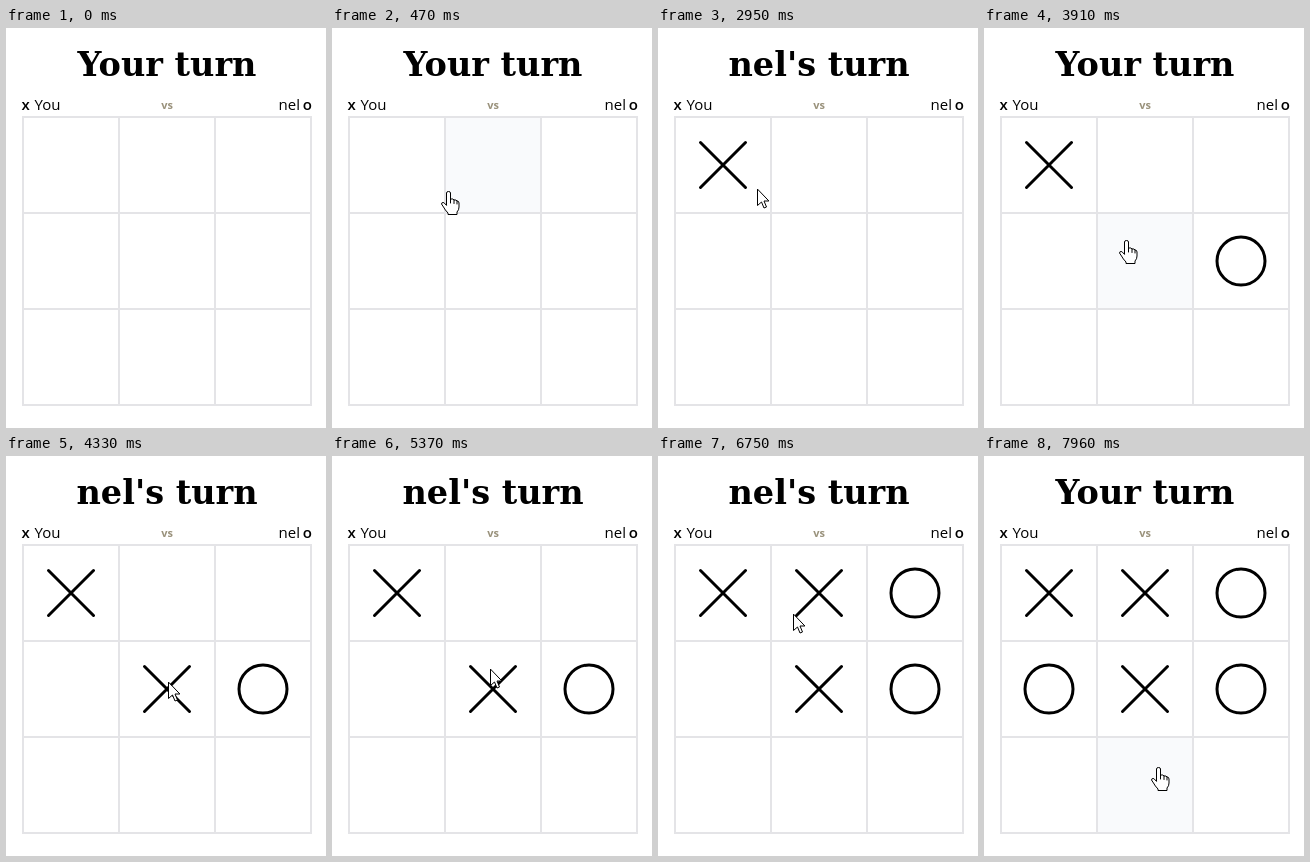
These frames come from a looping animation (320x400 px, 7.99 s). An HTML page:

```html
<!DOCTYPE html>
<html lang="en">
<head>
<meta charset="utf-8">
<title>Tic-tac-toe</title>
<style>
html, body { margin: 0; width: 100%; height: 100%; overflow: hidden; background: #fff; }
svg { display: block; width: 320px; height: 400px; }
text { font: 15px "Open Sans", "Noto Sans", sans-serif; }
.bold { font-weight: 600; }
#title { font: 700 33.5px "DejaVu Serif", "Noto Serif", serif; }
#vs { font-size: 11px; font-weight: 700; fill: #9a927c; }
#marks { fill: none; stroke: #000; stroke-width: 3; stroke-linecap: round; }
#cursor path { fill: #fff; stroke: #000; stroke-linejoin: round; stroke-linecap: round; }
</style>
</head>
<body>
<svg viewBox="0 0 320 400">
  <text id="title" x="161" y="48" text-anchor="middle">Your turn</text>
  <text class="bold" x="15.5" y="82">x</text>
  <text x="28.5" y="82">You</text>
  <text id="vs" x="161" y="81" text-anchor="middle">vs</text>
  <text x="294" y="82" text-anchor="end">nel</text>
  <text class="bold" x="306" y="82" text-anchor="end">o</text>
  <rect id="hover" width="96" height="96" fill="#f9fafc"/>
  <path d="M17 89H305V377H17ZM113 89V377M209 89V377M17 185H305M17 281H305" fill="none" stroke="#e4e4e7" stroke-width="2"/>
  <g id="marks"></g>
  <g id="cursor">
    <path id="arrow" d="M.5 .5V16.5L4.5 13L7 19L9.5 18L7 12H11.5Z"/>
    <g id="hand">
      <path d="M-1.5 14V2Q-1.5 .5 .5 .5Q2.5 .5 2.5 2V8Q5.5 7.5 6 9Q8.5 8.5 9 10Q11 10 11 12V16Q11 19 9 21V23.5H0V22Q-3 19 -4.5 16L-6.5 13Q-6.5 11 -4.5 11.5Z"/>
      <path d="M2.5 8V12M6 9V12.5M9 10V13" style="fill:none"/>
    </g>
  </g>
</svg>
<script>
const LOOP = 7990, LEFT = 17, TOP = 89, CELL = 96;
const $ = id => document.getElementById(id);

// players alternate, x first
const moves = [
  { at: 940, col: 0, row: 0 },
  { at: 3450, col: 2, row: 1 },
  { at: 4270, col: 1, row: 1 },
  { at: 5400, col: 2, row: 0 },
  { at: 6130, col: 1, row: 0 },
  { at: 7650, col: 0, row: 1 }
];

const entry = { x: 290, y: 384 };
const glides = [
  { from: 60, to: 570, x: 92, y: 154 },
  { from: 2900, to: 3070, x: 111, y: 167 },
  { from: 3720, to: 4090, x: 162, y: 226 },
  { from: 5170, to: 5370, x: 158, y: 213 },
  { from: 5610, to: 5900, x: 144, y: 125 },
  { from: 6400, to: 6750, x: 135, y: 158 },
  { from: 6860, to: 7140, x: 135, y: 168 },
  { from: 7630, to: 7960, x: 174, y: 311 }
];

const marks = moves.map(({ col, row }, i) => {
  const x = LEFT + (col + .5) * CELL, y = TOP + (row + .5) * CELL;
  const ns = "http://www.w3.org/2000/svg";
  const el = document.createElementNS(ns, i % 2 ? "circle" : "path");
  const attrs = i % 2
    ? { cx: x, cy: y, r: 24 }
    : { d: `M${x - 22.5} ${y - 22.5}l45 45m0-45l-45 45` };
  for (const k in attrs) el.setAttribute(k, attrs[k]);
  return $("marks").appendChild(el);
});

const easeOut = (k, power) => 1 - (1 - k) ** power;

// y settles sooner than x, which bends each glide
function pointer(t) {
  let { x, y } = entry;
  for (const g of glides) {
    const k = Math.min(1, Math.max(0, (t - g.from) / (g.to - g.from)));
    x += (g.x - x) * easeOut(k, 1.3);
    y += (g.y - y) * easeOut(k, 2);
  }
  return [Math.round(x), Math.round(y)];
}

const show = (el, on) => el.setAttribute("visibility", on ? "visible" : "hidden");

function draw(t) {
  const done = moves.filter(m => m.at <= t);
  const mine = done.length % 2 === 0;
  const text = mine ? "Your turn" : "nel's turn";
  if ($("title").textContent !== text) $("title").textContent = text;
  marks.forEach((el, i) => show(el, i < done.length));

  const seen = t >= glides[0].from;
  const [x, y] = pointer(t);
  const col = Math.floor((x - LEFT) / CELL), row = Math.floor((y - TOP) / CELL);
  const active = seen && mine && [col, row].every(n => n >= 0 && n < 3);
  const free = !done.some(m => m.col === col && m.row === row);

  $("cursor").setAttribute("transform", `translate(${x} ${y})`);
  show($("arrow"), seen && !active);
  show($("hand"), active);
  $("hover").setAttribute("x", LEFT + col * CELL);
  $("hover").setAttribute("y", TOP + row * CELL);
  show($("hover"), active && free);
}

const start = performance.now();
function tick() {
  draw((performance.now() - start) % LOOP);
  requestAnimationFrame(tick);
}
tick();
</script>
</body>
</html>
```
